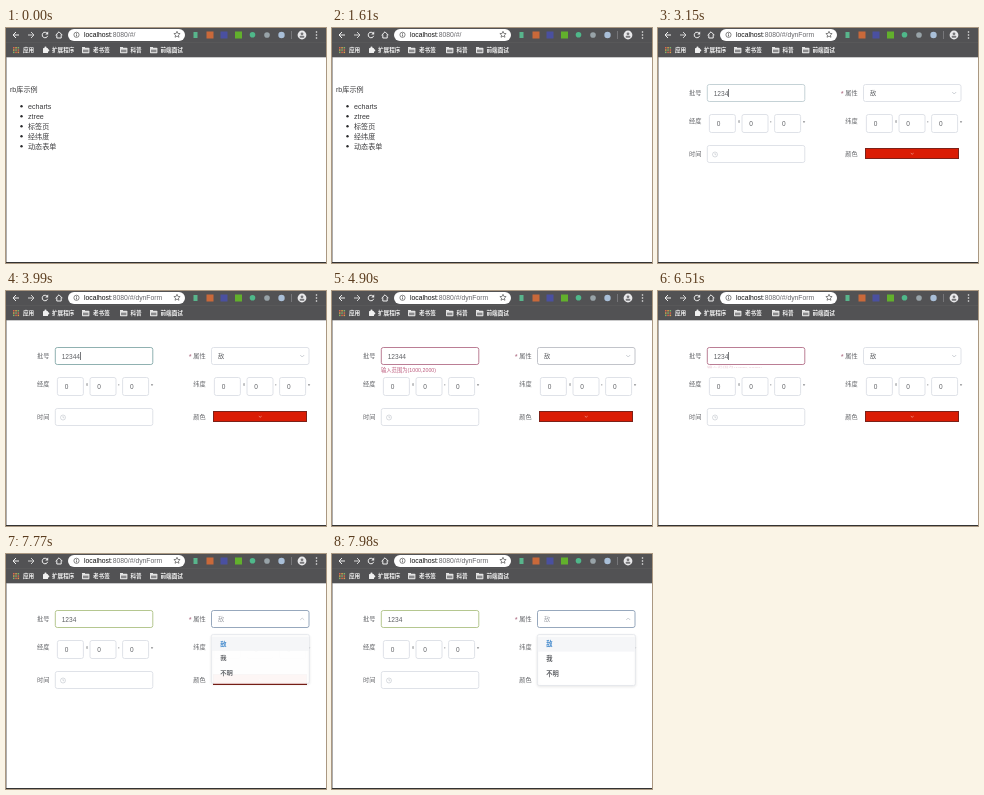
An HTML page with a canvas for the animation above (8000 ms loop, 320 px wide and 235 px high).

```html
<!DOCTYPE html>
<html lang="zh">
<head>
<meta charset="utf-8">
<title>动态表单</title>
<style>
html, body { margin: 0; width: 100%; height: 100%; overflow: hidden; background: #fff; }
canvas { display: block; width: 320px; height: 235px; }
</style>
</head>
<body>
<canvas id="stage"></canvas>
<script>
const W = 320, H = 235, LOOP = 8000, STEP = 70;
const FONT = '"Liberation Sans", "Noto Sans CJK SC", "Noto Sans CJK", sans-serif';
const INK = '#606266', LINE = '#dcdfe6';
const canvas = document.getElementById('stage');
const ctx = canvas.getContext('2d');
const dpr = window.devicePixelRatio || 1;
canvas.width = W * dpr;
canvas.height = H * dpr;

const ramp = (t, a, b) => Math.min(1, Math.max(0, (t - a) / (b - a)));
const ease = p => 1 - (1 - p) ** 2;

function mix(a, b, p) {
  const part = (c, i) => parseInt(c.slice(i, i + 2), 16);
  return 'rgb(' + [1, 3, 5].map(i => Math.round(part(a, i) + (part(b, i) - part(a, i)) * p)).join() + ')';
}

function text(s, x, cy, size, color = INK, weight = 400) {
  ctx.font = `${weight} ${size}px ${FONT}`;
  ctx.fillStyle = color;
  ctx.fillText(s, x, cy + size * 0.37);
  return x + ctx.measureText(s).width;
}

function rect(x, y, w, h, color) {
  ctx.fillStyle = color;
  ctx.fillRect(x, y, w, h);
}

function box(x, y, w, h, r, fill, stroke, lw = 0.9) {
  ctx.beginPath();
  ctx.roundRect(x, y, w, h, r);
  if (fill) { ctx.fillStyle = fill; ctx.fill(); }
  if (stroke) { ctx.strokeStyle = stroke; ctx.lineWidth = lw; ctx.stroke(); }
}

function dot(x, y, r, color) {
  ctx.beginPath();
  ctx.arc(x, y, r, 0, Math.PI * 2);
  ctx.fillStyle = color;
  ctx.fill();
}

function ring(x, y, r, color, lw = 0.7, from = 0, to = Math.PI * 2) {
  ctx.beginPath();
  ctx.arc(x, y, r, from, to);
  ctx.strokeStyle = color;
  ctx.lineWidth = lw;
  ctx.stroke();
}

function path(points, color, lw = 1, close = false) {
  ctx.beginPath();
  points.forEach(([x, y]) => ctx.lineTo(x, y));
  if (close) ctx.closePath();
  ctx.strokeStyle = color;
  ctx.lineWidth = lw;
  ctx.stroke();
}

function arrow(x, y, dir, color) {
  path([[x - 3 * dir, y], [x + 3 * dir, y]], color);
  path([[x, y - 3], [x + 3 * dir, y], [x, y + 3]], color);
}

function star(x, y) {
  const pts = [];
  for (let i = 0; i < 10; i++) {
    const a = -Math.PI / 2 + i * Math.PI / 5, r = i % 2 ? 1.5 : 3.3;
    pts.push([x + r * Math.cos(a), y + r * Math.sin(a)]);
  }
  path(pts, '#555', 0.7, true);
}

function folder(x) {
  rect(x, 19, 3, 1.2, '#e4e4e4');
  box(x, 19.8, 7.4, 5.4, 0.7, '#e4e4e4');
  rect(x + 1, 21.6, 5.4, 2.6, '#8a8a8c');
}

function browser(route) {
  rect(0, 0, W, 29.3, '#525254');
  rect(0, 14, W, 0.6, '#5c5c5e');

  arrow(10, 7, -1, '#f0f0f0');
  arrow(25, 7, 1, '#d4d4d4');
  ring(39, 7, 2.8, '#f0f0f0', 1, 0.3, 5.5);
  ctx.fillStyle = '#f0f0f0';
  ctx.beginPath();
  ctx.moveTo(42.2, 3.6); ctx.lineTo(42.2, 6.6); ctx.lineTo(39.2, 6.6);
  ctx.fill();
  path([[49.6, 7.2], [53, 3.8], [56.4, 7.2]], '#f0f0f0');
  path([[50.8, 6.4], [50.8, 10], [55.2, 10], [55.2, 6.4]], '#f0f0f0');

  box(62, 1, 117, 12, 6, '#fff');
  ring(70.5, 6.8, 2.6, '#555');
  rect(70.1, 6.4, 0.8, 2, '#555');
  rect(70.1, 5, 0.8, 0.8, '#555');
  const x = text('localhost', 78, 6.8, 6.8, '#111');
  text(':8080/#/' + route, x, 6.8, 6.8, '#68686c');
  star(171, 6.6);

  rect(187.5, 4, 4, 6, '#58b58c');
  rect(200.5, 3.5, 7, 7, '#c9693a');
  rect(214.5, 3.5, 7, 7, '#4a50a0');
  rect(229, 3.5, 7, 7, '#62b02c');
  dot(246.5, 6.8, 2.8, '#4fb88a');
  dot(261, 7, 2.8, '#98a3a8');
  dot(275.5, 7, 3.2, '#a9bfd8');
  rect(285, 3, 0.7, 8, '#89898b');
  dot(296, 7, 4.4, '#e9e9eb');
  dot(296, 5.8, 1.4, '#77777a');
  box(293.6, 7.7, 4.8, 2, 1, '#77777a');
  [4, 7, 10].forEach(y => dot(310.5, y, 0.8, '#eee'));

  const hues = ['#e0654f', '#dba14b', '#82b36b'];
  for (let i = 0; i < 9; i++) {
    const col = i % 3, row = Math.floor(i / 3);
    rect(7 + col * 2.3, 19 + row * 2.3, 1.5, 1.5, hues[(col + row) % 3]);
  }
  const label = (s, lx) => text(s, lx, 21.8, 5.6, '#f4f4f4', 700);
  label('应用', 17);
  box(37, 20, 5, 5, 0.6, '#f0f0f0');
  dot(39.5, 19.7, 1.1, '#f0f0f0');
  dot(42.2, 22.4, 1.1, '#f0f0f0');
  label('扩展程序', 46);
  [[76, '老书签', 87], [114, '科普', 124.5], [144, '前端面试', 154.5]].forEach(([fx, name, tx]) => {
    folder(fx);
    label(name, tx);
  });
}

function list() {
  text('rb库示例', 4, 61.2, 7.1, '#3a3a3c');
  ['echarts', 'ztree', '标签页', '经纬度', '动态表单'].forEach((s, i) => {
    dot(15.5, 78.3 + i * 10, 1.2, '#2c2c2e');
    text(s, 22, 78 + i * 10, 7.1, '#3a3a3c');
  });
}

function degrees(x) {
  ['°', "'", '"'].forEach((mark, i) => {
    const left = x + i * 32.6;
    box(left, 86.5, 26, 18, 2, '#fff', LINE);
    text('0', left + 7.3, 95.8, 6.5);
    text(mark, left + 28.3, 95.3, 6.6);
  });
}

// Border of the number field: idle, focused, invalid, valid
function borderColor(t) {
  if (t < 3990) return mix(LINE, '#84a9a9', ramp(t, 3080, 3290));
  if (t < 6510) return mix('#84a9a9', '#b4708a', ramp(t, 3990, 4270));
  return mix('#b4708a', '#adc184', ramp(t, 6510, 6650));
}

function caretOn(t) {
  return [[3150, 3640], [3990, 4480], [5040, 5600], [6090, 7140], [7420, 7560]]
    .some(([a, b]) => t >= a && t < b);
}

function errorShown(t) {
  if (t < 6510) return ease(ramp(t, 3990, 4340));
  return 0.35 * (1 - ramp(t, 6510, 6650));
}

function selectBorder(t) {
  const hover = t < 6510 ? (t >= 4480 ? 1 - ramp(t, 4900, 5110) : 0) : ramp(t, 7350, 7420);
  if (t < 7560) return mix(LINE, '#bcbec5', hover);
  return mix('#bcbec5', '#8c9fb6', ramp(t, 7490, 7700));
}

function dropdown(p) {
  if (!p) return;
  ctx.save();
  ctx.globalAlpha = p;
  ctx.translate(0, 80);
  ctx.scale(1, p);
  ctx.translate(0, -80);
  ctx.shadowColor = 'rgba(0,0,0,.09)';
  ctx.shadowBlur = 3 * dpr;
  ctx.shadowOffsetY = dpr;
  box(205.4, 80.5, 98, 51, 1.8, '#fff', '#e1e4ea', 0.7);
  ctx.shadowColor = 'transparent';
  rect(205.8, 83, 97.2, 14.6, '#f5f6f8');
  text('敌', 214.3, 90, 6.3, '#4087cb', 700);
  text('我', 214.3, 105, 6.3, INK, 700);
  text('不明', 214.3, 120, 6.3, INK, 700);
  ctx.restore();
}

function form(t) {
  text('批号', 31, 64.5, 6.2);
  text('*', 182.7, 65.6, 7.5, '#a8607a');
  [['经度', 31, 92.5], ['时间', 31, 126], ['属性', 187.3, 64.5], ['纬度', 187.3, 92.5], ['颜色', 187.3, 126]]
    .forEach(([s, x, y]) => text(s, x, y, 6.2));

  box(49.3, 56.5, 97.5, 17, 2, '#fff', borderColor(t));
  const end = text(t >= 3990 && t < 6510 ? '12344' : '1234', 55.7, 65.2, 6.6);
  if (caretOn(t)) rect(Math.floor(end), 61, 1, 8, '#77797c');

  const err = errorShown(t);
  if (err) {
    ctx.save();
    ctx.globalAlpha = err;
    ctx.translate(0, 75);
    ctx.scale(1, err);
    text('输入范围为(1000,2000)', 49, 3.7, 5.3, '#bd5b7d');
    ctx.restore();
  }

  const open = ease(ramp(t, 7490, 7840));
  box(205.5, 56.5, 97.5, 17, 2, '#fff', selectBorder(t));
  text('敌', 212, 65, 6.2, mix('#606266', '#a3a6ad', open));
  const flip = 1 - 2 * open;
  path([[294.2, 65 - flip], [296.2, 65 + flip], [298.2, 65 - flip]], '#b8bcc5', 0.7);

  degrees(51.4);
  degrees(208.4);

  box(49.3, 117.5, 97.5, 17, 2, '#fff', LINE);
  ring(57, 126.5, 2.5, '#c0c4cc', 0.6);
  path([[57, 125], [57, 126.7], [58.3, 126.7]], '#c0c4cc', 0.6);

  rect(207, 120, 94, 11, '#7c2118');
  rect(208, 121, 92, 9, '#da1c04');
  path([[252.8, 125.2], [254.2, 126.2], [255.6, 125.2]], '#f2a497', 0.7);

  dropdown(open);
}

function draw(t) {
  ctx.setTransform(dpr, 0, 0, dpr, 0, 0);
  rect(0, 0, W, H, '#fff');
  const onForm = t >= 2030;
  browser(onForm ? 'dynForm' : '');
  if (onForm) form(t); else list();
  rect(0, 29, 0.6, H - 29, '#777');
  rect(0, H - 1, W, 1, '#333');
}

const start = performance.now();
function tick() {
  const t = (performance.now() - start) % LOOP;
  draw(Math.floor(t / STEP) * STEP);
  requestAnimationFrame(tick);
}
tick();
</script>
</body>
</html>
```
